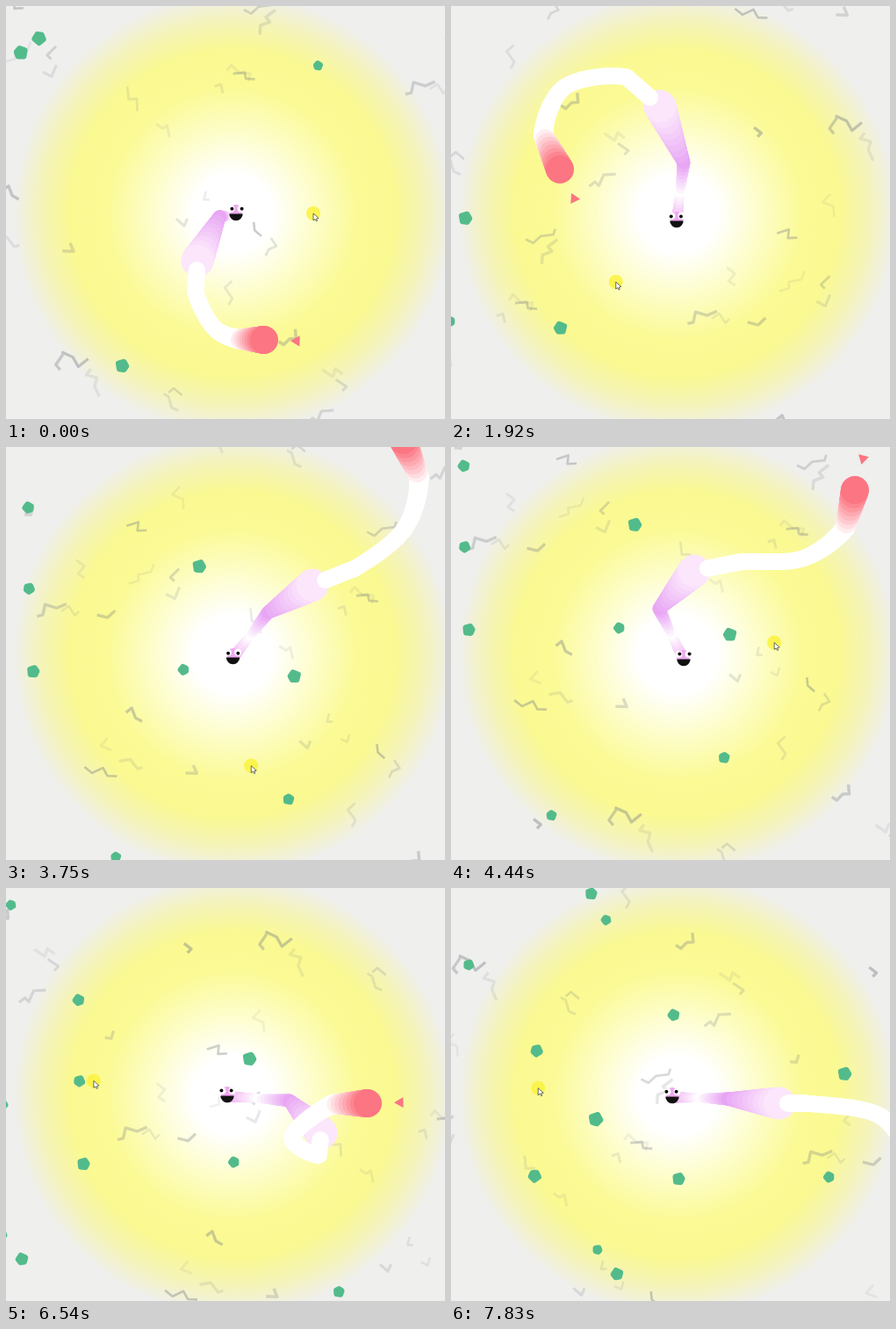
An HTML page with a canvas for the animation above (7860 ms loop, 500x470 px).

```html
<!DOCTYPE html>
<html lang="en">
<head>
<meta charset="utf-8">
<title>Worm</title>
<style>
html, body { margin: 0; width: 100%; height: 100%; overflow: hidden; background: #efefee; }
canvas { display: block; }
</style>
</head>
<body>
<canvas id="stage" width="500" height="470"></canvas>
<script>
const ctx = document.getElementById('stage').getContext('2d');
const LOOP = 7860, STEP = 30, SPEED = 0.133;
const CENTER = [258, 236];

// cam: camera in the world; aim: pointer angle and distance;
// spine: mouth, start and end of the lilac bulge, three points of the white part, tail
const poses = [
  { t: 0, cam: [0, 0], aim: [0, 92],
    spine: [[262,237], [243,240], [218,290], [216,325], [236,365], [264,379], [294,380]] },
  { t: 1920, cam: [116, 168], aim: [132, 105],
    spine: [[257,245], [265,178], [238,114], [200,81], [130,92], [105,147], [124,186]] },
  { t: 3060, cam: [-8, 211], aim: [168, 146],
    spine: [[252,238], [318,241], [368,207], [390,160], [376,90], [336,41], [289,36]] },
  { t: 4440, cam: [-77, 321], aim: [-7, 111],
    spine: [[265,242], [237,184], [277,141], [328,131], [400,127], [449,92], [460,49]] },
  { t: 5250, cam: [-6, 280], aim: [-128, 128],
    spine: [[260,232], [228,278], [181,243], [186,207], [220,181], [286,178], [330,168]] },
  { t: 6540, cam: [-145, 215], aim: [-174, 159],
    spine: [[252,237], [323,242], [359,279], [356,304], [326,283], [372,246], [412,245]] },
  { t: 7830, cam: [-316, 198], aim: [-177, 159],
    spine: [[252,238], [315,240], [374,245], [405,245], [488,259], [528,312], [545,350]] }
];

// places in the world, largest bite first
const food = [
  [-151,462], [16,53], [38,36], [133,410], [240,535], [-221,525], [-56,529], [-127,638], [-219,383], [-156,204],
  [-62,343], [-62,435], [234,674], [115,527], [-296,286], [37,740], [-139,234], [-149,610], [355,68]
].map(([x, y], i, all) => ({ x, y, r: 7.5 - 3 * i / all.length, end: Infinity }));

const mix = (a, b, u) => a + (b - a) * u;
const mix2 = (a, b, u) => a.map((v, i) => mix(v, b[i], u));
const add = (a, b) => a.map((v, i) => v + b[i]);
const smooth = u => u * u * (3 - 2 * u);
const mod = (a, n) => (a % n + n) % n;
const polar = (ang, r) => [Math.cos(ang) * r, Math.sin(ang) * r];
const rad = deg => deg * Math.PI / 180;
const wrap = a => Math.atan2(Math.sin(a), Math.cos(a));
const angle = (a, b) => Math.atan2(b[1] - a[1], b[0] - a[0]);
const length = (a, b) => Math.hypot(b[0] - a[0], b[1] - a[1]);
const links = points => points.slice(1).map((p, i) => ({ len: length(points[i], p), ang: angle(points[i], p) }));

let seed = 11;
const random = () => (seed = seed * 16807 % 2147483647) / 2147483647;

function chain(head, list) {
  const points = [head];
  list.forEach(({ len, ang }, i) => points.push(add(points[i], polar(ang, len))));
  return points;
}

// The camera leaves and arrives at crawling speed in the direction of the pointer.
function glide(a, b, u) {
  const dist = SPEED * (b.t - a.t);
  const out = polar(rad(a.aim[0]), dist * u * (1 - u) ** 2);
  const back = polar(rad(b.aim[0]), -dist * u * u * (1 - u));
  return add(mix2(a.cam, b.cam, smooth(u)), add(out, back));
}

// Drag the body behind the mouth, then turn its links gradually into the next pose.
function drag(a, b) {
  const n = (b.t - a.t) / STEP, la = links(a.spine), lb = links(b.spine), part = [];
  const body = a.spine.map(p => add(p, a.cam));
  for (let j = 0; j <= n; j++) {
    const u = j / n, cam = glide(a, b, u), head = mix2(a.spine[0], b.spine[0], u);
    body[0] = add(head, cam);
    const pulled = la.map((l, i) => {
      const link = { len: mix(l.len, lb[i].len, u), ang: angle(body[i], body[i + 1]) };
      body[i + 1] = add(body[i], polar(link.ang, link.len));
      return link;
    });
    part.push({ u, cam, head, pulled, aim: mix2(a.aim, b.aim, u) });
  }
  const miss = part[n].pulled.map((l, i) => wrap(lb[i].ang - l.ang));
  for (const f of part) {
    f.spine = chain(f.head, f.pulled.map((l, i) => ({ len: l.len, ang: l.ang + miss[i] * f.u })));
  }
  return part;
}

const film = [];
for (let k = 1; k < poses.length; k++) {
  film.pop();
  film.push(...drag(poses[k - 1], poses[k]));
}

for (const bite of food) {
  const hit = film.findIndex(f => length(add(f.head, f.cam), [bite.x, bite.y]) < 22);
  if (hit >= 0) bite.end = hit;
}

// Zigzag scratches on a patch of ground that repeats
const PATCH = [560, 530];
const scratches = Array.from({ length: 38 }, () => {
  const points = [[0, 0]], count = 2 + Math.floor(random() * 2.5);
  let ang = random() * 7, bend = random() < .5 ? 1 : -1;
  for (let i = 0; i < count; i++) {
    points.push(add(points[i], polar(ang, 6 + random() * 9)));
    ang += bend * (.6 + random() * 1.4);
    bend = -bend;
  }
  return { points, place: PATCH.map(size => random() * size), alpha: .1 + .35 * random() ** 1.5, width: 2.5 + random() };
});

const glow = ctx.createRadialGradient(...CENTER, 0, ...CENTER, 250);
[[0, '#fff'], [.18, '#fff'], [.38, '#fdfdc8'], [.58, '#fbfa94'], [.74, '#faf992'], [.87, '#f5f4b8'], [1, '#efefee']]
  .forEach(([at, color]) => glow.addColorStop(at, color));

function disc(x, y, r, color) {
  ctx.fillStyle = color;
  ctx.beginPath();
  ctx.arc(x, y, r, 0, 7);
  ctx.fill();
}

function trace(points) {
  ctx.beginPath();
  points.forEach(p => ctx.lineTo(...p));
}

function drawScratches(cam) {
  ctx.strokeStyle = '#7c8286';
  for (const { points, place, alpha, width } of scratches) {
    const at = place.map((v, i) => mod(v - 1.6 * cam[i], PATCH[i]) - 30);
    ctx.globalAlpha = alpha;
    ctx.lineWidth = width;
    trace(points.map(p => add(p, at)));
    ctx.stroke();
  }
  ctx.globalAlpha = 1;
}

function drawFood(frame, cam) {
  ctx.fillStyle = ctx.strokeStyle = '#53bb8b';
  ctx.lineWidth = 6;
  food.forEach(({ x, y, r, end }, i) => {
    if (frame >= end) return;
    trace([0, 1, 2, 3, 4].map(c =>
      add([x - cam[0], y - cam[1]], polar(rad(c * 72 + i * 47), (r - 2) * (1 + .2 * Math.sin(c * 5 + i))))));
    ctx.closePath();
    ctx.fill();
    ctx.stroke();
  });
}

const PINK = [239, 168, 240], LILAC = [232, 166, 244], PALE = [251, 230, 252];
const WHITE = [255, 255, 255], RED = [251, 117, 130];

// A tapering run of discs whose colour changes in bands
function tube(point, r0, r1, c0, c1, from = 0) {
  for (let s = 0; s <= 40; s++) {
    const u = mix(from, 1, s / 40);
    disc(...point(u), mix(r0, r1, u), `rgb(${mix2(c0, c1, Math.floor(u * 8) / 8)})`);
  }
}

const line = (a, b) => u => mix2(a, b, u);
const curve = (a, b, c, d) => u => b.map((p, i) =>
  p + u / 2 * (c[i] - a[i] + u * (2 * a[i] - 5 * p + 4 * c[i] - d[i] + u * (3 * (p - c[i]) + d[i] - a[i]))));

function drawBody([mouth, neck, bulge, w0, w1, w2, tail]) {
  const waist = mix2(mouth, neck, .48);
  tube(line(mouth, waist), 6.5, 5, PINK, WHITE);
  tube(line(waist, neck), 5, 7.5, WHITE, LILAC);
  tube(line(neck, bulge), 7.5, 18.5, LILAC, PALE);
  tube(line(bulge, w0), 9.5, 9.5, WHITE, WHITE, .3);
  tube(curve(bulge, w0, w1, w2), 9.5, 9.5, WHITE, WHITE);
  tube(curve(w0, w1, w2, tail), 9.5, 11, WHITE, WHITE);
  tube(line(w2, tail), 11, 16, WHITE, RED);

  const back = angle(w2, tail), tip = add(tail, polar(back, 37));
  ctx.fillStyle = '#fb7582';
  trace([180, 300, 60].map(a => add(tip, polar(back + rad(a), 7))));
  ctx.fill();
}

function drawFace([x, y], aim) {
  const [lx, ly] = polar(rad(aim), 1);
  disc(x, y - 4, 7, `rgb(${PINK})`);
  for (const side of [-5.6, 5.6]) {
    disc(x + side, y - 6.3, 4, '#fff');
    disc(x + side + lx, y - 6.3 + ly, 2, '#111');
  }
  ctx.fillStyle = '#111';
  ctx.beginPath();
  ctx.arc(x, y - .5, 7.7, 0, Math.PI);
  ctx.fill();
}

function drawPointer([deg, dist]) {
  const at = add(CENTER, polar(rad(deg), dist));
  disc(...at, 8, 'rgba(250,242,62,.85)');
  ctx.fillStyle = '#fff';
  ctx.strokeStyle = '#444';
  ctx.lineWidth = .8;
  trace([[0, 0], [0, 8], [2, 6.5], [3.5, 9], [4.5, 8.5], [3.5, 6], [6, 5.5]].map(p => add(at, p)));
  ctx.closePath();
  ctx.fill();
  ctx.stroke();
}

function draw(now) {
  const frame = Math.min(film.length - 1, Math.floor(now % LOOP / STEP)), f = film[frame];
  ctx.lineJoin = 'round';
  ctx.fillStyle = glow;
  ctx.fillRect(0, 0, 500, 470);
  drawScratches(f.cam);
  drawFood(frame, f.cam);
  drawBody(f.spine);
  drawFace(f.head, f.aim[0]);
  drawPointer(f.aim);
}

const start = performance.now();
function tick() {
  draw(performance.now() - start);
  requestAnimationFrame(tick);
}
tick();
</script>
</body>
</html>
```
